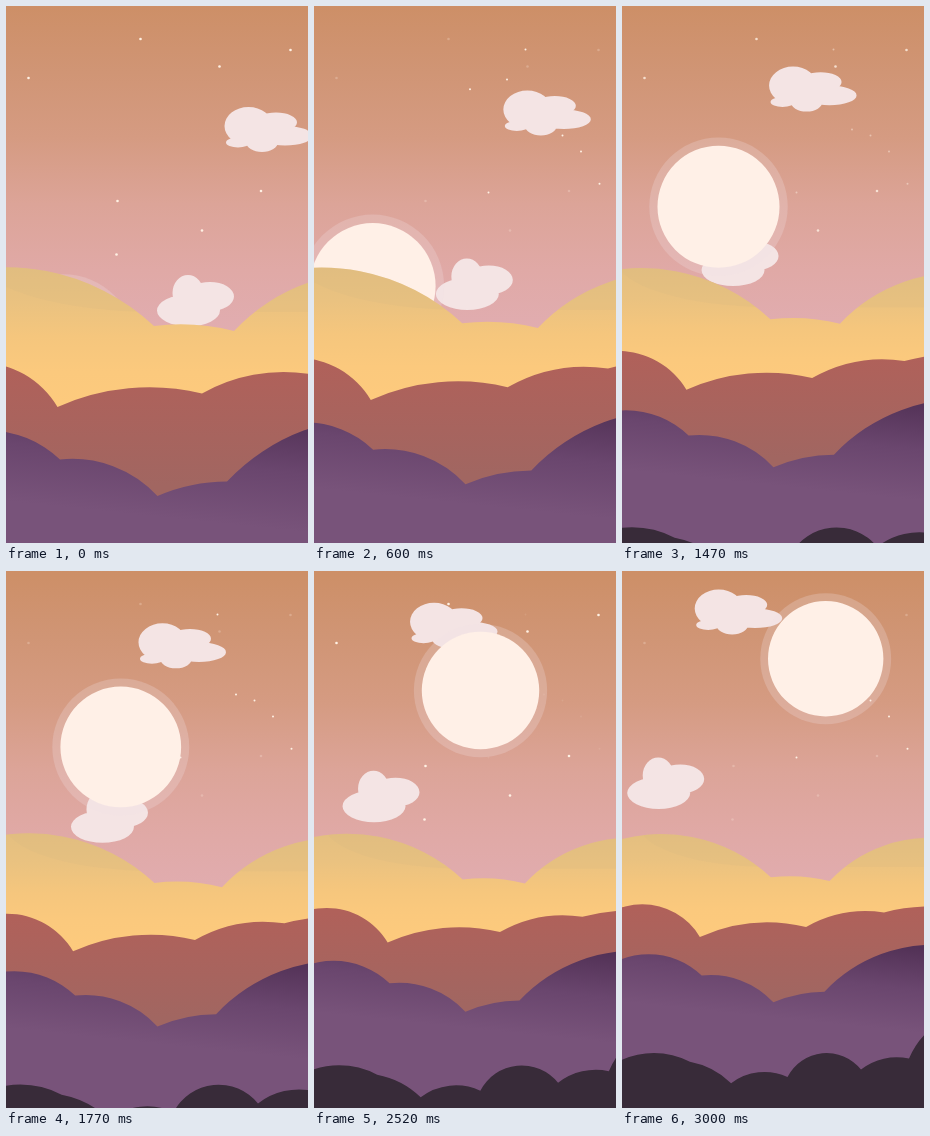
An HTML page with a canvas that plays this animation: 302 by 537 pixels, repeating every 3030 ms.

```html
<!DOCTYPE html>
<html lang="en">
<head>
<meta charset="utf-8">
<title>Sunrise</title>
<style>
html, body { margin: 0; width: 302px; height: 537px; overflow: hidden; }
canvas { display: block; }
</style>
</head>
<body>
<canvas id="stage" width="302" height="537"></canvas>
<script>
const W = 302, H = 537, LOOP = 3030, STEP = 30;
const ctx = document.getElementById('stage').getContext('2d');
const clamp = (v, lo, hi) => Math.max(lo, Math.min(hi, v));

// A row of humps: a start point, then valleys [x, y, radius of the arc leading there]
function ridge([x, y], ...valleys) {
  const arcs = valleys.map(([vx, vy, r]) => `A${r} ${r} 0 0 1 ${vx} ${vy}`);
  return new Path2D(`M${x} ${y}${arcs.join('')}V900H${x}Z`);
}

const yellow = ridge([-80, 276], [148, 320, 218], [228, 325, 220], [390, 268.5, 185]);
const red = ridge([-105, 401], [51.5, 401, 91], [196, 387.5, 226], [302, 367.8, 165], [400, 362, 250]);
const purple = ridge([-90, 453.5], [54, 453.5, 104], [151.5, 490, 116], [221, 475.5, 175], [390, 412.6, 204]);
const dark = ridge([-60, 571], [38, 571, 106], [94, 600, 110], [170.7, 591.6, 75],
  [270.7, 581.4, 60], [336, 566.5, 79], [415, 502, 109]);
const shade = new Path2D('M-30 250A180 56 0 0 0 150 306H400V200H-30Z');

function cloud(...puffs) {
  const path = new Path2D();
  for (const [x, y, rx, ry] of puffs) {
    path.moveTo(x + rx, y);
    path.ellipse(x, y, rx, ry, 0, 0, 2 * Math.PI);
  }
  return path;
}

const clouds = [
  cloud([242.5, 120, 24, 19], [270, 116.3, 21, 9.7], [279, 129.8, 27, 9.8], [256, 136, 16, 10], [232, 136.5, 12, 5]),
  cloud([182.5, 304.5, 31.5, 16], [182, 287, 15.5, 18], [204, 290.5, 24, 14.5])
];

const brightStars = [[134.5, 33], [284.5, 44], [213.5, 60.5], [22.5, 72], [255, 185], [111.5, 195], [196, 224.5], [110.5, 248.5]];

// Faint stars scatter over the right half of the sky
const random = n => Math.abs(Math.sin(n * 127.1) * 43758.5) % 1;
const faintStars = Array.from({ length: 8 }, (_, i) => [156 + 18.5 * i, 27 + 200 * random(i + 1)]);

function gradient(x0, y0, x1, y1, ...colors) {
  const g = ctx.createLinearGradient(x0, y0, x1, y1);
  colors.forEach((color, i) => g.addColorStop(i / (colors.length - 1), color));
  return g;
}

function fill(path, color) {
  ctx.fillStyle = color;
  ctx.fill(path);
}

function disc(x, y, r, color) {
  fill(cloud([x, y, r, r]), color);
}

function stars(list, r, alpha) {
  ctx.globalAlpha = clamp(alpha, 0, 1);
  for (const [x, y] of list) disc(x, y, r, '#fff1e4');
  ctx.globalAlpha = 1;
}

function drawSky(t) {
  ctx.fillStyle = gradient(0, 0, 0, 330, '#cd8f67', '#d09575', '#d59b82', '#dca498', '#e0a9a6', '#e1adb1');
  ctx.fillRect(0, 0, W, H);

  const pulse = Math.cos(2 * Math.PI * (t - 0.6) / 1.2);
  stars(brightStars, 1.3, Math.max(0.25, 0.7 - 0.6 * pulse));
  stars(faintStars, 1, 0.55 + 0.55 * pulse);

  ctx.save();
  ctx.translate(-48.6 * t, -27.5 * t);
  for (const c of clouds) fill(c, '#f4e4e4');
  ctx.restore();

  const x = 57 + t * (-22.2 + t * (48.69 + t * (-12.41 + t * 1.36)));
  const y = 341 - 106 * t + 7.2 * t * t;
  const r = 64.2 - 2.17 * t;
  disc(x, y, r * 1.135, 'rgba(240,222,226,.25)');
  disc(x, y, r, '#fff0e7');
}

// The hills shrink together towards the middle of the stage
function drawHills(t) {
  const zoom = 1 - 0.0883 * t;
  ctx.save();
  ctx.translate(W / 2, H / 2);
  ctx.scale(zoom, zoom);
  ctx.translate(-W / 2, -H / 2);

  fill(yellow, gradient(0, 262, 0, 400, '#e4bf80', '#eac280', '#f5c67d', '#fbc97d', '#fdca7d'));
  ctx.save();
  ctx.clip(yellow);
  fill(shade, 'rgba(214,180,126,.22)');
  ctx.restore();

  fill(red, gradient(0, 362, 0, 480, '#b0615a', '#a16661'));
  fill(purple, gradient(320, 412, 308, 527, '#523156', '#6a466e', '#78537a'));
  fill(dark, '#382b39');
  ctx.restore();
}

function tick() {
  const ms = performance.now() % LOOP;
  const t = Math.floor(ms / STEP) * STEP / 1000;
  drawSky(t);
  drawHills(t);
  requestAnimationFrame(tick);
}
tick();
</script>
</body>
</html>
```
